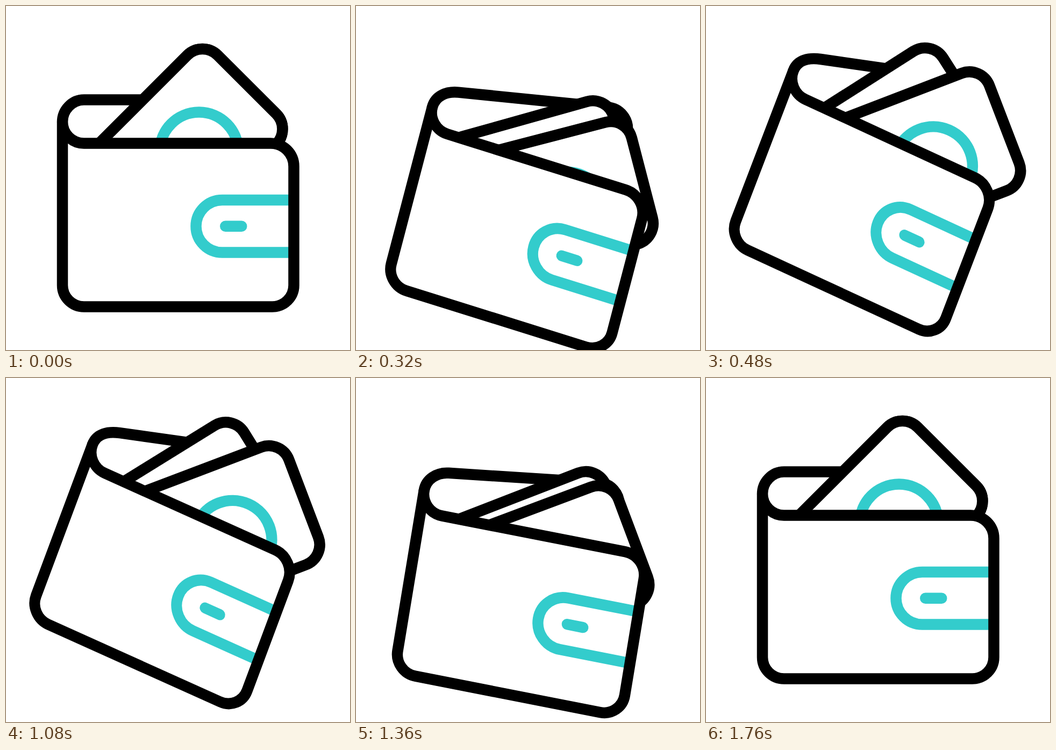
Recreate the animation shown at these times as an HTML page. Size 640x640 px, loop 2000 ms.

```html
<!DOCTYPE html>
<html lang="en">
<head>
<meta charset="utf-8">
<title>Wallet</title>
<style>
  html, body { margin: 0; width: 100%; height: 100%; overflow: hidden; background: #fff; }
  svg { display: block; width: 100%; height: 100%; }
  .ink { stroke: #000; }
  .teal { stroke: #33cccc; fill: none; }
  .paper { fill: #fff; }
</style>
</head>
<body>
<svg viewBox="0 0 640 640" fill="none" stroke-width="20.5" stroke-linecap="round">
  <path id="flap" class="ink"/>
  <g id="cards">
    <g id="backCard">
      <rect class="ink paper" x="-280" y="-40" width="320" height="234" rx="40"/>
    </g>
    <g id="frontCard">
      <rect class="ink paper" x="-280" y="-40" width="320" height="234" rx="40"/>
      <circle class="teal" cx="-111" cy="102" r="73"/>
    </g>
  </g>
  <g id="body">
    <path id="panel" class="paper"/>
    <path class="teal" d="M213-46.5H82a48.75 48.75 0 0 0 0 97.5H213" stroke-linecap="butt"/>
    <path class="teal" d="M88 2.2h30"/>
    <path id="outline" class="ink"/>
  </g>
</svg>
<script>
const LOOP = 2000;
const TILT = 24.8;
const HALF_W = 215.25, HALF_H = 152, R = 40;
const byId = id => document.getElementById(id);
const flap = byId('flap'), cards = byId('cards'), body = byId('body');
const backCard = byId('backCard'), frontCard = byId('frontCard');

const shape = `M${R - HALF_W} ${-HALF_H}H${HALF_W - 43}a43 43 0 0 1 43 43V${HALF_H - R}` +
  `a40 40 0 0 1 -40 40H${R - HALF_W}a40 40 0 0 1 -40 -40V${-HALF_H - R}a40 40 0 0 0 40 40Z`;
byId('panel').setAttribute('d', shape);
byId('outline').setAttribute('d', shape);

// tilt share, centre y, then x, y and angle of the back and the front card
const rest = [0, 407.5, 45.25, -287.5, 45, 45.25, -287.5, 45];
const open = [1, 387.5, -6.7, -293.8, 57.3, 86.9, -288, 45.8];
const keys = [
  [0, rest],
  [240, [.5, 442, 80, -241, 31, 106, -218, 31]],
  [320, [.698, 436.5, 69.3, -252, 33, 112.8, -225, 31.9]],
  [480, open],
  [1040, open],
  [1240, [.681, 417.5, 49.8, -270.7, 40.8, 104.3, -249.6, 36.2]],
  [1380, [.41, 440, 76, -243, 32, 103, -222, 31.5]],
  [1520, [.139, 425.9, 70.6, -259.6, 35.5, 79.5, -245, 35.5]],
  [1600, [.05, 411, 57, -274, 40.5, 59, -270, 40.5]],
  [1760, rest],
  [LOOP, rest]
];

const rise = (i, c) => (keys[i + 1][1][c] - keys[i][1][c]) / (keys[i + 1][0] - keys[i][0]);

// Monotone slope: flat at turning points and at both ends
function slope(i, c) {
  if (i === 0 || i === keys.length - 1) return 0;
  const a = rise(i - 1, c), b = rise(i, c);
  return a * b > 0 ? 2 * a * b / (a + b) : 0;
}

function pose(t) {
  let i = 0;
  while (i < keys.length - 2 && t >= keys[i + 1][0]) i++;
  const [t0, from] = keys[i], [t1, to] = keys[i + 1];
  const d = t1 - t0, s = (t - t0) / d, q = 1 - s;
  return from.map((v, c) =>
    v * q * q * (1 + 2 * s) + to[c] * s * s * (3 - 2 * s) +
    d * s * q * (slope(i, c) * q - slope(i + 1, c) * s));
}

const unit = deg => [Math.cos(deg * Math.PI / 180), Math.sin(deg * Math.PI / 180)];

function draw(t) {
  const [k, cy, bx, by, bAngle, fx, fy, fAngle] = pose(t);
  const cx = 320.25 - 30 * k, tilt = TILT * k;
  const [ux, uy] = unit(tilt);
  const [c, s] = unit(tilt * .845);
  const squash = 1 - .012 * k;
  const vx = -s * squash, vy = c * squash;
  const place = (x, y) => [cx + x * ux + y * vx, cy + x * uy + y * vy];

  body.setAttribute('transform', `matrix(${[ux, uy, vx, vy, cx, cy]})`);
  cards.setAttribute('transform', `translate(${cx} ${cy}) rotate(${tilt})`);
  backCard.setAttribute('transform', `translate(${bx} ${by}) rotate(${-bAngle})`);
  frontCard.setAttribute('transform', `translate(${fx} ${fy}) rotate(${-fAngle})`);

  // The rear panel hinges on the body but tilts less
  const [px, py] = place(-HALF_W, -HALF_H - R);
  const [ax, ay] = place(R - HALF_W, -HALF_H - 81);
  const [dx, dy] = unit(tilt * .33);
  const h = 22;
  flap.setAttribute('d',
    `M${px} ${py}C${px - h * vx} ${py - h * vy} ${ax - h * dx} ${ay - h * dy} ${ax} ${ay}` +
    `l${280 * dx} ${280 * dy}a40 40 0 0 1 ${R * (dx - dy)} ${R * (dx + dy)}`);
}

const start = performance.now();
function tick() {
  draw((performance.now() - start) % LOOP);
  requestAnimationFrame(tick);
}
tick();
</script>
</body>
</html>
```
